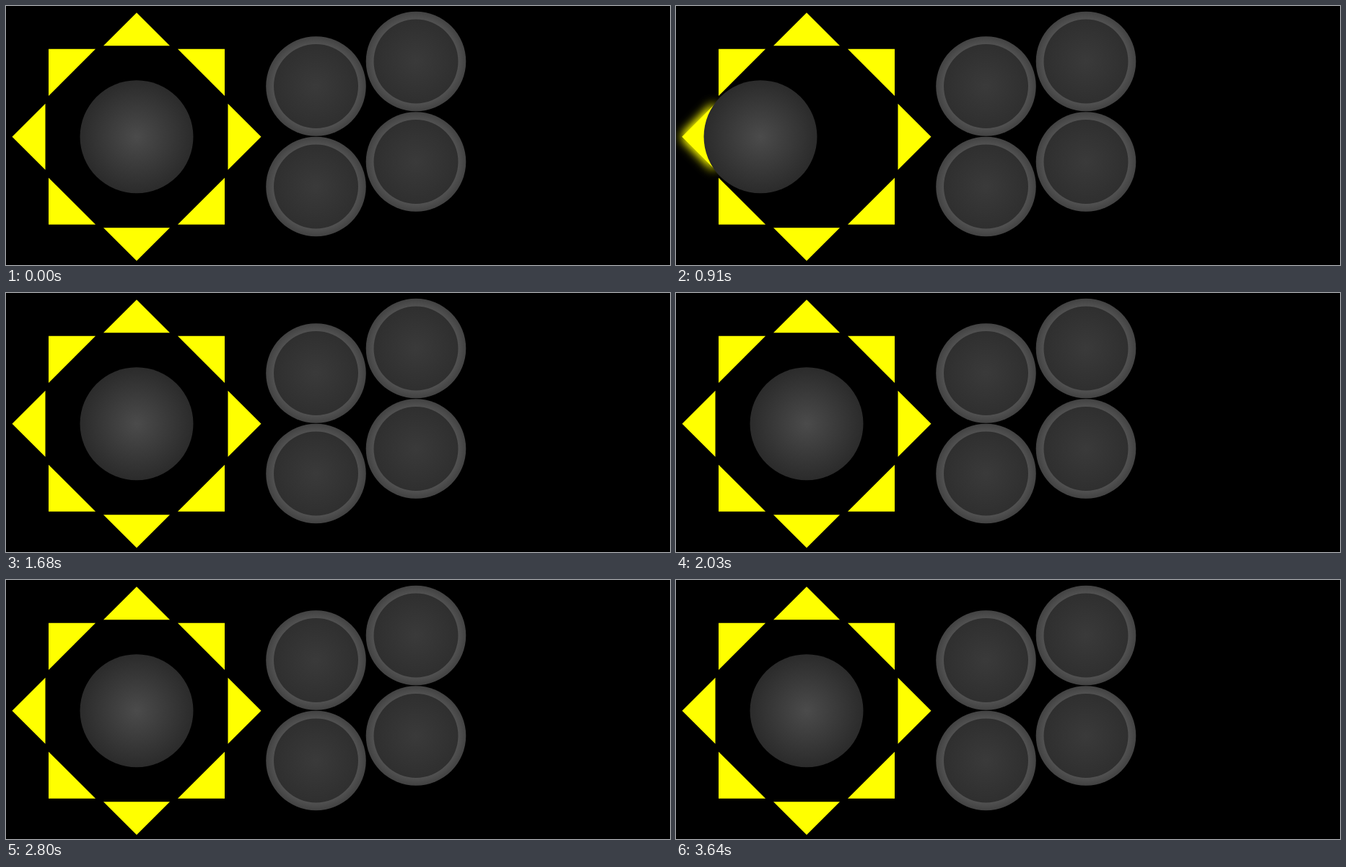
These frames come from a looping animation (920x360 px, 4.2 s). An HTML page with a canvas:

```html
<!DOCTYPE html>
<html lang="en">
<head>
<meta charset="utf-8">
<title>Arcade stick rotation</title>
<style>
  html, body { margin: 0; width: 920px; height: 360px; overflow: hidden; background: #000; }
  canvas { display: block; }
</style>
</head>
<body>
<canvas id="stage" width="920" height="360"></canvas>
<script>
const ctx = document.getElementById("stage").getContext("2d");
const LOOP = 4200, TICK = 70;
const CENTER = { x: 181, y: 181.8 };
const THROW = 64, BALL_RADIUS = 78.5;
const FIRST_TURN = 5, TICKS_PER_TURN = 2, DIRECTIONS = 8;
const YELLOW = "#ffff00";
const BUTTONS = [[429.5, 111.5], [568, 77], [429.5, 251], [568, 216.5]];

function disc(x, y, radius, inner, outer, from = 0) {
  const shade = ctx.createRadialGradient(x, y, from, x, y, radius);
  shade.addColorStop(0, inner);
  shade.addColorStop(1, outer);
  ctx.fillStyle = shade;
  ctx.beginPath();
  ctx.arc(x, y, radius, 0, Math.PI * 2);
  ctx.fill();
}

function arrow(direction, lit) {
  ctx.save();
  ctx.translate(CENTER.x, CENTER.y);
  ctx.rotate(direction * Math.PI / 4);
  ctx.fillStyle = YELLOW;
  ctx.beginPath();
  ctx.moveTo(172.5, 0);
  ctx.lineTo(126.5, -46);
  ctx.lineTo(126.5, 46);
  ctx.closePath();
  if (lit) {
    ctx.shadowColor = YELLOW;
    ctx.shadowBlur = 15;
    ctx.fill();
  }
  ctx.fill();
  ctx.restore();
}

// Clockwise from the right, or -1 while the stick rests in the middle.
function stickDirection(time) {
  const tick = Math.floor((time % LOOP) / TICK);
  const turn = Math.floor((tick - FIRST_TURN) / TICKS_PER_TURN);
  return turn >= 0 && turn < DIRECTIONS ? turn : -1;
}

function draw(time) {
  const active = stickDirection(time);
  ctx.fillStyle = "#000";
  ctx.fillRect(0, 0, 920, 360);

  for (let i = 0; i < DIRECTIONS; i++) arrow(i, i === active);

  for (const [x, y] of BUTTONS) {
    disc(x, y, 69.3, "#525252", "#424242", 58);
    disc(x, y, 58.5, "#3a3a3a", "#2f2f2f");
  }

  const angle = active * Math.PI / 4;
  const reach = active < 0 ? 0 : THROW;
  disc(CENTER.x + reach * Math.cos(angle), CENTER.y + reach * Math.sin(angle),
    BALL_RADIUS, "#4b4b4b", "#2b2b2b");
}

function play(now) {
  draw(now);
  requestAnimationFrame(play);
}

draw(0);
requestAnimationFrame(play);
</script>
</body>
</html>
```
